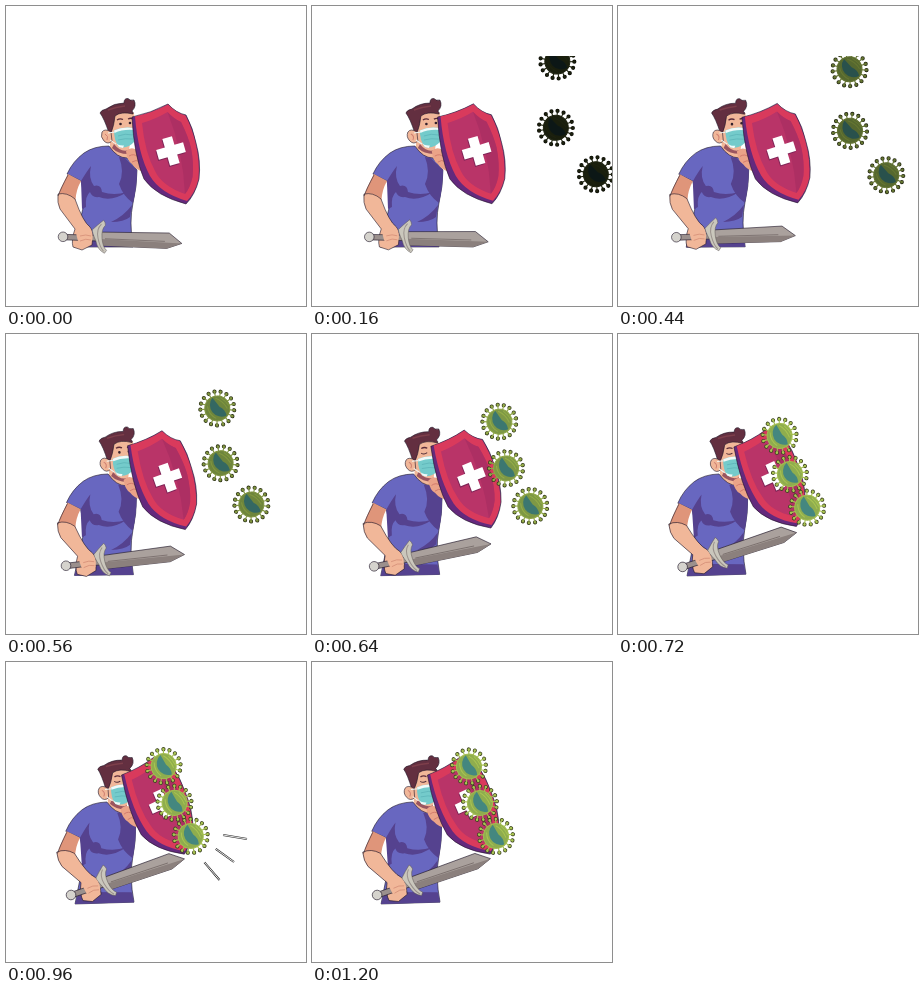
Recreate the animation shown at these times as an HTML page. Size 300x300 px, loop 1.44 s.

```html
<!DOCTYPE html>
<html lang="en">
<head>
<meta charset="utf-8">
<title>Shield against viruses</title>
<style>
@property --q { syntax: '<number>'; inherits: true; initial-value: 0; }
@property --light { syntax: '<number>'; inherits: true; initial-value: 0; }
@property --head { syntax: '<number>'; inherits: true; initial-value: 0; }
@property --tail { syntax: '<number>'; inherits: true; initial-value: 0; }

html, body { margin: 0; width: 100%; height: 100%; overflow: hidden; background: #fff; }
svg {
  display: block; width: 100vw; height: 100vh;
  animation: push 1440ms infinite, light 1440ms infinite, head 1440ms infinite, tail 1440ms infinite;
}

/* Every segment advances in 40 ms steps. */
@keyframes push {
  0% { --q: 0; animation-timing-function: steps(7); }
  19.444% { --q: .07; animation-timing-function: steps(4); }
  30.555% { --q: .19; animation-timing-function: steps(3); }
  38.888% { --q: .41; animation-timing-function: steps(2); }
  44.444% { --q: .67; animation-timing-function: steps(2); }
  50% { --q: .95; animation-timing-function: steps(6); }
  66.666% { --q: .993; animation-timing-function: steps(6); }
  83.333%, 100% { --q: 1; }
}
@keyframes light {
  0% { --light: 0; animation-timing-function: step-end; }
  5.555% { --light: .06; animation-timing-function: steps(5); }
  19.444% { --light: .34; animation-timing-function: steps(4); }
  30.555% { --light: .6; animation-timing-function: steps(5); }
  44.444% { --light: .88; animation-timing-function: steps(2); }
  50%, 100% { --light: 1; }
}
@keyframes head {
  0%, 50% { --head: 0; animation-timing-function: steps(6); }
  66.666%, 100% { --head: 1; }
}
@keyframes tail {
  0%, 55.555% { --tail: 0; animation-timing-function: steps(4); }
  66.666% { --tail: .43; animation-timing-function: steps(5); }
  80.555%, 100% { --tail: 1; }
}

.body { transform-origin: 100px 240px; transform: translateX(calc(var(--q) * 1px)) rotate(calc(var(--q) * -1.8deg)); }
.face { transform-origin: 110px 148px; transform: translate(calc(var(--q) * -2px), calc(var(--q) * 1px)) rotate(calc(var(--q) * 4deg)); }
.open { opacity: calc(50 - var(--q) * 100); }
.shut { opacity: calc(var(--q) * 100 - 50); }
.forearm { transform-origin: 55px 192px; transform: rotate(calc(var(--q) * -11deg)); }
.sword {
  transform: translate(calc(77px + var(--q) * 7px), calc(231.5px - var(--q) * 5px))
    rotate(calc(2deg - var(--q) * 21deg));
}
.shield {
  transform-origin: 181px 196px;
  transform: translate(calc(var(--q) * -2px), calc(var(--q) * -6px))
    rotate(calc(var(--q) * -8deg)) scaleX(calc(1 - var(--q) * .05));
}
.viruses { filter: brightness(var(--light)); opacity: calc(var(--light) * 1000); }
.virus {
  transform: translate(calc(var(--x) * 1px + (1 - var(--q)) * var(--dx) * 1px),
      calc(var(--y) * 1px + (1 - var(--q)) * var(--dy) * 1px))
    rotate(calc(var(--q) * 15deg));
}
.sparks use {
  stroke-dasharray: 0 calc(var(--tail) * 100px) calc((var(--head) - var(--tail)) * 100px) 300px;
}
.edge { stroke: #21182a; stroke-width: .6; stroke-linejoin: round; }
.skin { fill: #f1b799; }
.shade { fill: #55428f; }
</style>
</head>
<body>
<svg viewBox="0 0 300 300">
  <defs>
    <clipPath id="stage"><path d="M0 50H300V250H0Z"/></clipPath>
    <g id="virus">
      <g fill="none">
        <circle r="17" stroke="#3d4420" stroke-width="4.2" stroke-linecap="round" pathLength="17" stroke-dasharray="0 1"/>
        <circle r="14.500" stroke="#a3bd50" stroke-width="5" pathLength="17" stroke-dasharray=".22 .78" stroke-dashoffset=".11"/>
        <circle r="17" stroke="#a9c452" stroke-width="2.6" stroke-linecap="round" pathLength="17" stroke-dasharray="0 1"/>
      </g>
      <circle r="12.500" fill="#8fad4e" stroke="#a3bd50"/>
      <path d="M-6-10Q-1-5 2-2Q8 0 10 6A11.600 11.600 0 0 1-6-10Z" fill="#44877f"/>
      <path d="M-3-10Q5-8 10-1M2-11Q8-8 11-4M-10-1Q-8 7 0 10" fill="none" stroke="#a9c452"/>
    </g>
    <path id="cross" d="M-5-14H5V-5H14V5H5V14H-5V5H-14V-5H-5Z"/>
    <g id="rays">
      <path pathLength="100" d="M199 170L241 177"/>
      <path pathLength="100" d="M196 177L228 200"/>
      <path pathLength="100" d="M187 187L213.500 218"/>
    </g>
  </defs>

  <g class="body">
    <path class="skin" d="M104 134L104 143Q112 154 122 152L124 137Z"/>
    <path d="M108 138Q115 147 123 144L122 148Q112 148 106 142Z" fill="#9a5560"/>
    <path class="edge" d="M103 140Q88 140 78 147Q67 155 61 168L75 175Q79 190 77 202L68 241H127Q123 215 127 197Q131 180 131 164L121 152Q111 152 103 140Z" fill="#6867c0"/>
    <path class="shade" d="M72 229L68 241H127L125 231Z"/>
    <path class="shade" d="M119 152L131 164Q131 180 127 197Q117 190 113 178Q119 166 113 151Z"/>
    <path class="shade" d="M75 175Q81 165 85 160Q82 172 88 180Q95 178 96 186Q108 190 121 186Q106 196 93 191Q86 192 84 186Q79 190 80 201L76 203ZM126 199Q118 210 105 216Q118 216 124 211Z"/>
    <g class="face">
      <path class="skin" d="M102 113Q112 102 128 107L129 126Q127 138 119 141Q108 140 104 131Z"/>
      <path class="edge" d="M103 127Q98 112 94 107Q95 104 100 103Q108 97 118 97Q118 92 122 92.500Q124 95 128 94Q131 100 126 105Q128 107 127 108Q115 105 109 110Q108 120 105 127Z" fill="#632f40"/>
      <path d="M102 104Q110 101 119 100" stroke="#7d3f4b" stroke-width="1.5" fill="none"/>
      <path class="edge skin" d="M105 126Q99 122 96 126Q94 131 98 135Q102 139 106 135Z"/>
      <path d="M99 128Q103 130 101 134" fill="none" stroke="#cf8071"/>
      <path d="M111 114Q114 112 117 113.500M122 113Q125 111.500 127 113" fill="none" stroke="#5a2c3a" stroke-width="1.3"/>
      <g class="open" fill="#33202c"><circle cx="114.500" cy="118" r="1.3"/><circle cx="124" cy="117" r="1.3"/></g>
      <path class="shut" d="M111 118.500Q114 120.500 117 118M122 118Q125 119.500 127 117.500" fill="none" stroke="#4a2834"/>
      <path d="M109 126L102 127M110 138L104 134" stroke="#eef7f6"/>
      <path d="M108 124.500Q117 120 128 122L128 136Q122 143 113 141Q108 135 108 124.500Z" fill="#74cbcb"/>
      <path d="M108 124.500Q117 120 128 122V124Q117 123 108.500 127ZM109.500 136Q112 140 118 139.500L117 142L113 141Z" fill="#f1faf9"/>
      <path d="M112 130Q119 127 127 129M112 134Q119 132 127 133" fill="none" stroke="#5bb2b6" stroke-width=".7"/>
    </g>
    <path d="M62 168L75 175Q70 184 69.500 194Q60 204 53 197Q51 190 55 182Z" fill="#df957a"/>
    <g class="forearm">
      <path class="edge skin" d="M52 188Q51 197 54 203L69 223Q65 234 67 241L76 244L86 239Q88 226 84 221Q77 216 69 193Q61 186 52 188Z"/>
    </g>
    <path d="M62 169Q55 182 52 190" class="edge" fill="none"/>
  </g>

  <g class="sword">
    <path class="edge" d="M-18-2.500H17V3H-18Z" fill="#9b908d"/>
    <circle class="edge" cx="-20" cy="0" r="4.800" fill="#d5d3cd"/>
    <path class="edge" d="M17-6L86-7.500L99 2.500L84 8L17 7.500Z" fill="#aaa19d"/>
    <path d="M17 1L99 2.500L84 8L17 7.500Z" fill="#8b807d"/>
    <path d="M22 .5L82 1" stroke="#766b69" stroke-width=".8"/>
    <path d="M20-18Q22-16 22-13Q18-9 19 0Q20 9 24 12L22 15Q15 12 13 3Q9-5 9-8Q14-13 20-18Z" fill="#cac7bc" stroke="#5f5858" stroke-width=".5"/>
    <path d="M18-14Q13-9 15 0Q17 9 21 13" fill="none" stroke="#9a918c"/>
  </g>
  <g class="body"><g class="forearm">
    <path class="skin" d="M70 223Q78 219 84 222Q88 228 86 235Q83 240 77 240Q70 237 70 223Z"/>
    <path d="M74 230Q80 228 85 230M74 235Q80 232 85 234" fill="none" stroke="#d58f78" stroke-width=".8"/>
  </g></g>

  <g class="shield">
    <path d="M120 145Q125 140 131 144L138 166Q130 164 126 158Q121 155 120 145Z" fill="#eba388"/>
    <path d="M123 150Q128 147 132 151M126 156Q130 153 134 156" fill="none" stroke="#cc7468" stroke-width=".8"/>
    <path class="edge" d="M126 111Q145 107 162 98Q170 107 180 109Q187 122 190 137Q195 155 193 173Q189 189 180 198Q150 190 138 173Q128 150 126 111Z" fill="#64297d"/>
    <path d="M129 110.500Q146 107 162 98.500Q170 107 179.500 109.500Q186 122 189.500 137Q194 155 192.500 173Q189 187 181 195Q154 187 144 170Q132 148 129 110.500Z" fill="#d93a5c"/>
    <path d="M136 117Q150 113 161.500 106Q168 113 175 116Q182 130 185 142Q188 158 186.500 171Q184 182 179 188Q156 180 149 165Q139 147 136 117Z" fill="#b93468"/>
    <path d="M161.500 106Q168 113 175 116Q182 130 185 142Q188 158 186.500 171Q184 182 179 188Q177 145 161.500 106Z" fill="#ad2f63"/>
    <g transform="translate(165 145) rotate(-16)">
      <use href="#cross" fill="#7f2457" x="-1" y="1"/>
      <use href="#cross" fill="#fff"/>
    </g>
  </g>

  <g clip-path="url(#stage)"><g class="viruses">
    <use class="virus" href="#virus" style="--x:157;--y:104.500;--dx:92;--dy:-51"/>
    <use class="virus" href="#virus" style="--x:168;--y:141;--dx:79;--dy:-20"/>
    <use class="virus" href="#virus" style="--x:184;--y:174;--dx:104;--dy:-6"/>
  </g></g>

  <g class="sparks" fill="none">
    <use href="#rays" stroke="#2a2a2a" stroke-width="2"/>
    <use href="#rays" stroke="#fff" stroke-width=".9"/>
  </g>
</svg>
</body>
</html>
```
